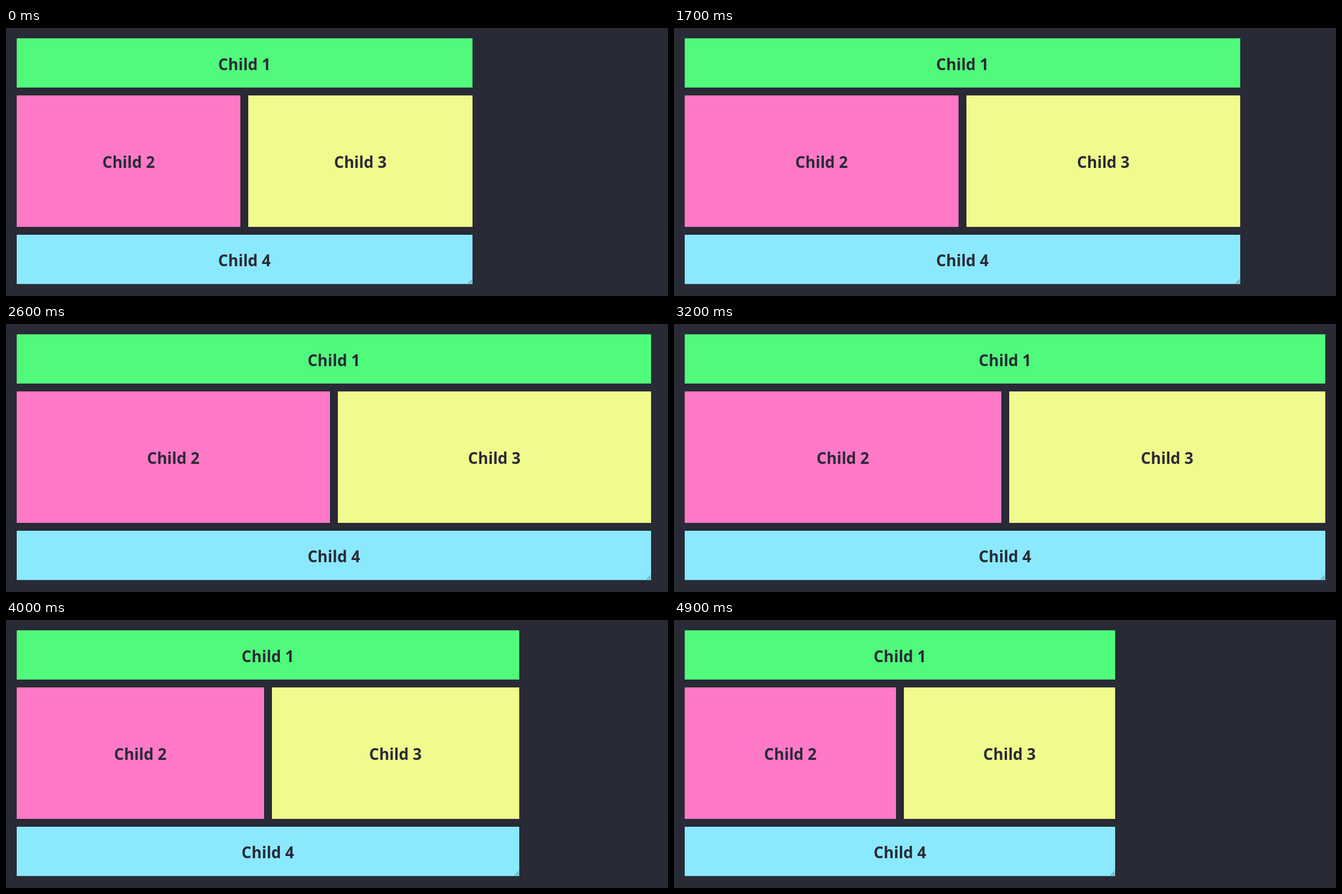
Write an HTML page that moves like this. It is 1175 by 477 pixels and loops after 5900 ms.

```html
<!DOCTYPE html>
<html lang="en">
<head>
<meta charset="utf-8">
<title>Resizable grid</title>
<style>
  html, body {
    margin: 0;
    width: 100%;
    height: 100%;
    overflow: hidden;
    background: #282a36;
  }
  body {
    position: relative;
    box-shadow: inset 0 -1px #20222b;
  }
  .parent {
    position: absolute;
    left: 19px;
    top: 18px;
    width: 808.5px;
    display: grid;
    grid-template: 88px 234px 88px / 1fr 1fr;
    gap: 14px;
    animation: resize 5900ms step-end infinite;
  }
  .child {
    box-sizing: border-box;
    display: flex;
    align-items: center;
    justify-content: center;
    padding-top: 2px;
    font: 700 27.7px "Open Sans", "Noto Sans", sans-serif;
    color: #282a36;
    white-space: pre;
  }
  .wide { grid-column: 1 / 3; }
  .green { background: #50fa7b; border-top: 1px solid #42b463; }
  .pink { background: #ff79c6; }
  .yellow { background: #f1fa8c; }
  .blue { background: #8be9fd; border-bottom: 1px solid #6cabbd; }
  .grip {
    position: absolute;
    right: 0;
    bottom: 1px;
    width: 8px;
    height: 8px;
    fill: none;
    stroke: #3a4450;
  }

  /* The drag is sampled every 100 ms, so each stretch moves in whole steps. */
  @keyframes resize {
    0%      { width: 808.5px; }
    18.643% { width: 834px; animation-timing-function: steps(5); }
    27.118% { width: 964px; }
    28.813% { width: 986px; animation-timing-function: steps(5); }
    37.287% { width: 1098px; animation-timing-function: steps(2); }
    40.677% { width: 1119px; animation-timing-function: steps(3); }
    45.762% { width: 1129px; }
    49.152% { width: 1134px; }
    50.847% { width: 1138px; }
    54.237% { width: 1137px; animation-timing-function: steps(5); }
    62.711% { width: 985px; animation-timing-function: steps(6); }
    72.881% { width: 798px; animation-timing-function: steps(2); }
    76.271% { width: 776px; animation-timing-function: steps(2); }
    79.660% { width: 765px; }
    83.050%, 100% { width: 764px; }
  }
</style>
</head>
<body>
  <div class="parent">
    <div class="child wide green">Child 1</div>
    <div class="child pink">Child 2</div>
    <div class="child yellow">Child 3</div>
    <div class="child wide blue">Child 4</div>
    <svg class="grip" viewBox="0 0 8 8"><path d="M.5 7.5l7-7M4.5 7.5l3-3"/></svg>
  </div>
</body>
</html>
```
